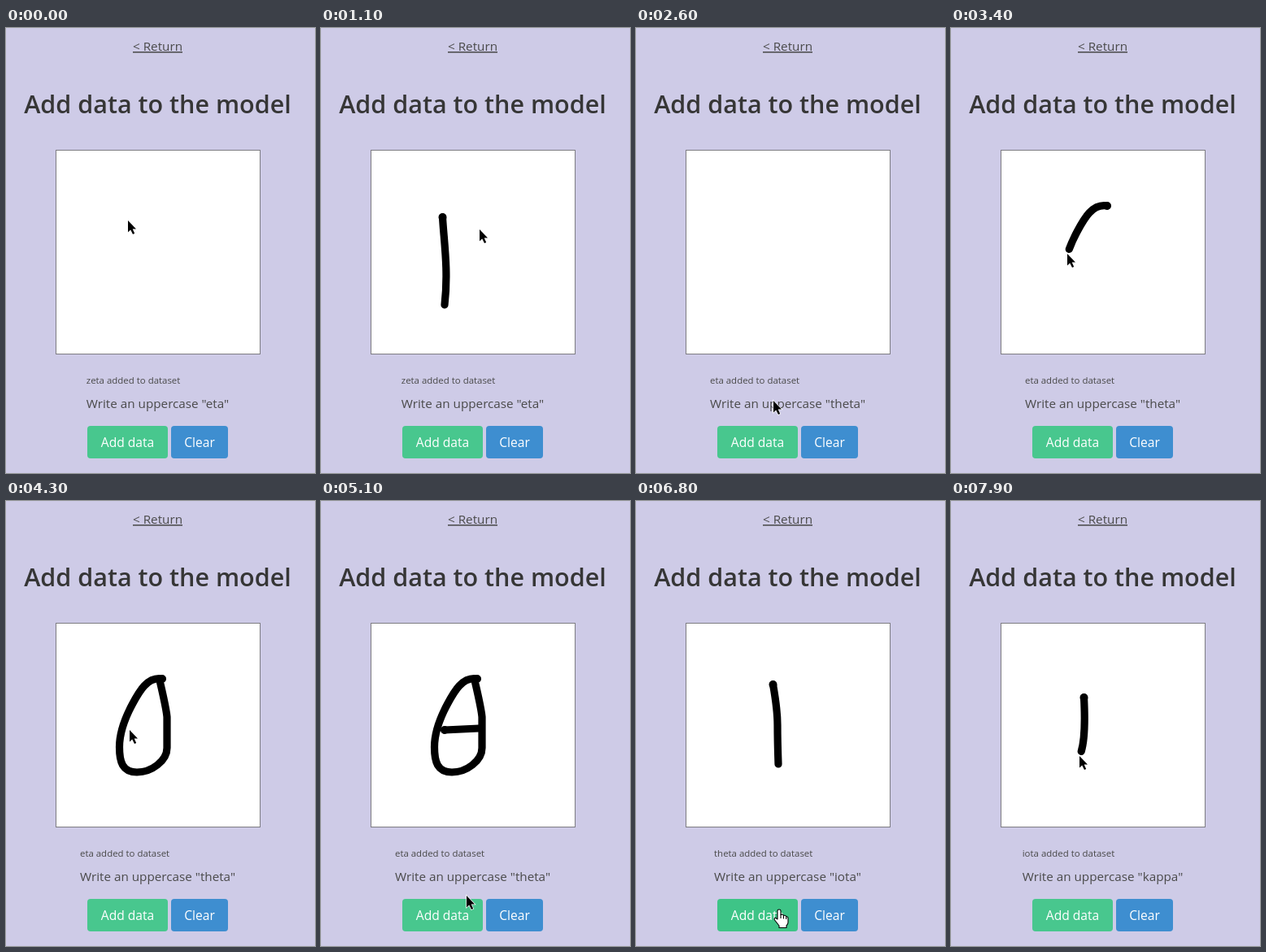
An HTML page for the animation above (8000 ms loop, 380 px wide and 548 px high).

```html
<!DOCTYPE html>
<html lang="en">
<head>
<meta charset="utf-8">
<title>Add data to the model</title>
<style>
  html, body { margin: 0; width: 100%; height: 100%; overflow: hidden; background: #cecbe7; }
  svg { display: block; width: 380px; height: 548px; font: 15.25px "Open Sans", "Noto Sans", sans-serif; fill: #4a4a4a; }
  .title { font-size: 30.5px; font-weight: 600; fill: #363636; }
  .status { font-size: 11.45px; }
  .button { font-size: 15.6px; fill: #fff; }
  .mid { text-anchor: middle; }
  .ink { fill: none; stroke: #000; stroke-width: 9.2; stroke-linecap: round; stroke-linejoin: round; }
</style>
</head>
<body>
<svg viewBox="0 0 380 548">
  <defs>
    <marker id="dot" markerUnits="userSpaceOnUse" markerWidth="1" markerHeight="1" overflow="visible">
      <circle r="5" fill="#000"/>
    </marker>
  </defs>
  <rect width="380" height="548" fill="#cecbe7"/>
  <text class="mid" x="186.5" y="28" text-decoration="underline">&lt; Return</text>
  <text class="title mid" x="186.5" y="105">Add data to the model</text>
  <rect x="61.5" y="150.5" width="251" height="251" fill="#fff" stroke="#7d7c82"/>
  <g id="strokes" class="ink"></g>
  <text id="status" class="status" y="438"></text>
  <text id="prompt" y="468"></text>
  <rect id="add" x="100" y="490" width="99" height="40" rx="4"/>
  <rect x="203" y="490" width="70" height="40" rx="4" fill="#3e8ed0"/>
  <text class="button mid" x="149.5" y="516">Add data</text>
  <text class="button mid" x="238" y="516">Clear</text>
  <g id="cursor">
    <path id="arrow" d="M0 0V14.5L3.2 11.5 6 17 8.2 16 5.7 10.5H10Z" fill="#000" stroke="#fff" stroke-width="1.4" paint-order="stroke"/>
    <g id="hand" fill="#fff" stroke="#000" stroke-width="1.1" stroke-linejoin="round">
      <path d="M-2 1.5Q-2 0 0 0T2 1.5V6.5Q5 5.5 5.5 7.5 8 6.7 8.7 8.8 11 8.5 11 11V16Q11 18 9 20V22.5H0V20L-5.5 13Q-6.5 10.8-4.5 10.3L-2 12Z"/>
      <path d="M2 6.5V11M5.5 7.5V11.5M8.7 8.8V12" fill="none"/>
    </g>
  </g>
</svg>
<script>
const LOOP = 8000, STEP = 100, INK_LAG = 6, CENTER = 186.5, BUTTON_Y = 503;
const names = ['zeta', 'eta', 'theta', 'iota', 'kappa'];
const el = id => document.getElementById(id);
const show = (node, on) => { node.style.display = on ? '' : 'none'; };
const smooth = k => k * k * (3 - 2 * k);

function stroke(start, end, d) {
  const path = document.createElementNS('http://www.w3.org/2000/svg', 'path');
  path.setAttribute('d', d);
  path.setAttribute('marker-start', 'url(#dot)');
  el('strokes').append(path);
  const length = path.getTotalLength();
  const at = t => path.getPointAtLength(length * (t - start) / (end - start));
  return { start, end, path, length, at };
}

// A press rests on the button; the page turns just after it ends.
const press = (start, end, x) => ({ start, end, at: () => ({ x, y: BUTTON_Y }) });

const pages = [
  [
    stroke(200, 600, 'M149.5 233C151 262 157 298 152 341'),
    stroke(1100, 1400, 'M194.5 248Q199 304 191.5 344'),
    stroke(1700, 1900, 'M155 302L195 300'),
    press(2260, 2400, 165)
  ],
  [
    stroke(3200, 3900, 'M192 219C174 216 164 234 155 251S139.5 285 139.5 303 143 334 161 334 198 320 198 304V266Q197 255 189 221'),
    stroke(4300, 4600, 'M152 282L194 280'),
    press(5200, 5380, 178)
  ],
  [
    stroke(6200, 6500, 'M168.5 226Q174 257 174 276T175 324'),
    press(6800, 7100, 176)
  ],
  [stroke(7600, LOOP, 'M163.5 242Q166 290 160 309T151 337')]
];
const actions = pages.flat();
const turns = pages.map(page => page.at(-1).end);

// The pointer follows each action and glides smoothly from one to the next.
function pointerAt(t) {
  const i = actions.findIndex(a => t < a.end);
  const next = actions[i];
  if (t >= next.start) return next.at(t);
  const last = actions[i - 1];
  const t0 = last ? last.end : 0;
  const from = last ? last.at(t0) : { x: 150, y: 237 };
  const to = next.at(next.start);
  const k = smooth((t - t0) / (next.start - t0));
  return { x: from.x + (to.x - from.x) * k, y: from.y + (to.y - from.y) * k };
}

function drawStroke(s, t, onPage) {
  show(s.path, onPage && t > s.start);
  const k = (t - s.start) / (s.end - s.start);
  const drawn = k < 1 ? Math.max(0.1, s.length * k - INK_LAG) : s.length + 1;
  s.path.style.strokeDasharray = `${drawn} 999`;
}

function render(t) {
  const current = turns.findIndex(end => t <= end);
  pages.forEach((page, i) => page.filter(a => a.path).forEach(s => drawStroke(s, t, i === current)));

  el('status').textContent = `${names[current]} added to dataset`;
  el('prompt').textContent = `Write an uppercase "${names[current + 1]}"`;
  const left = CENTER - el('prompt').getComputedTextLength() / 2;
  for (const id of ['status', 'prompt']) el(id).setAttribute('x', left);

  const { x, y } = pointerAt(t);
  const hover = x >= 100 && x < 199 && y >= 490 && y < 530;
  el('cursor').setAttribute('transform', `translate(${Math.round(x)} ${Math.round(y)})`);
  show(el('arrow'), !hover);
  show(el('hand'), hover);
  el('add').setAttribute('fill', hover ? '#3ec487' : '#48c78e');
}

function tick() {
  render(Math.floor(performance.now() % LOOP / STEP) * STEP);
  requestAnimationFrame(tick);
}
tick();
</script>
</body>
</html>
```
